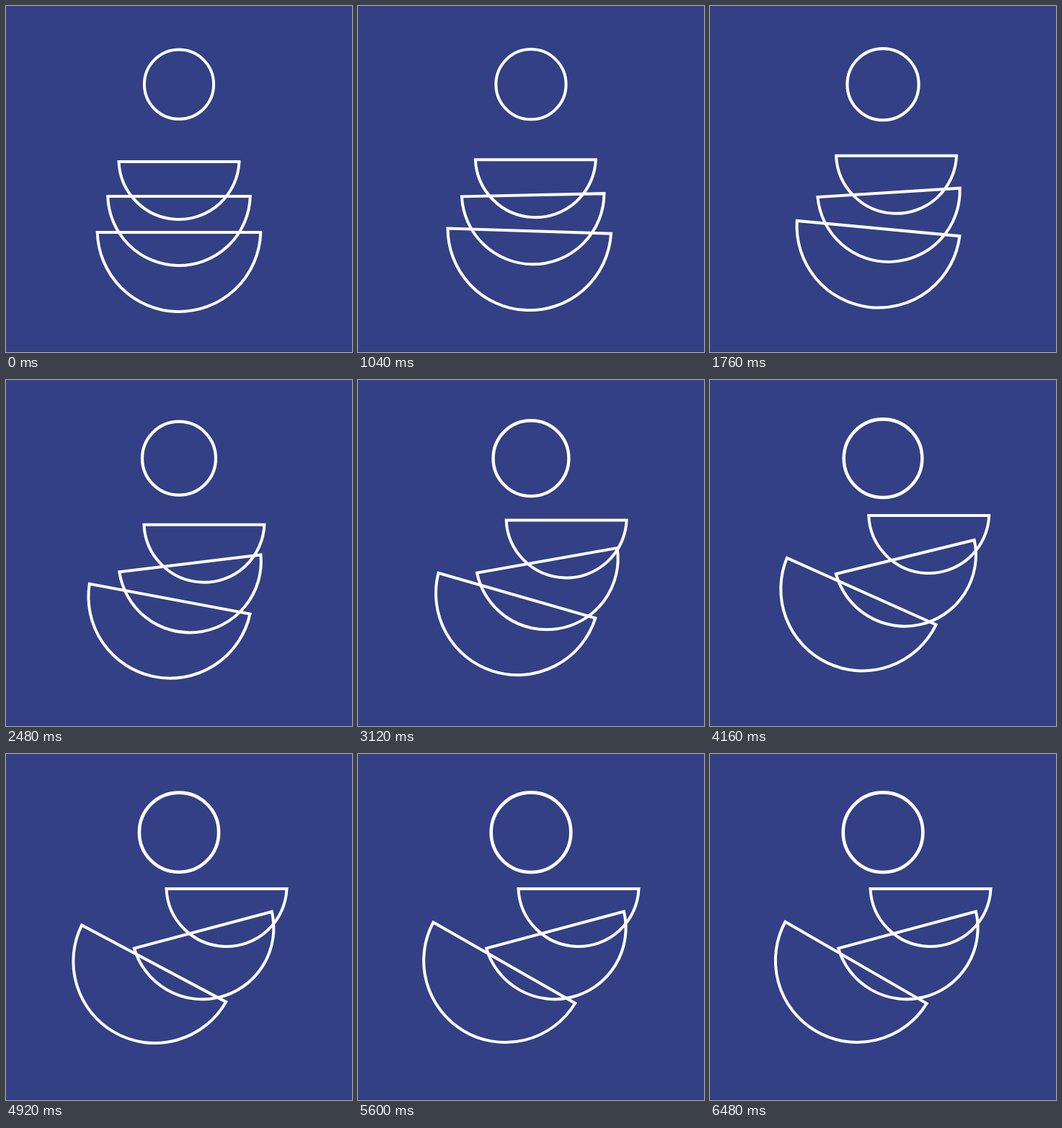
Recreate the animation shown at these times as an HTML page with a canvas. Size 480 by 480 pixels, loop 6.52 s.

```html
<!DOCTYPE html>
<html lang="en">
<head>
<meta charset="utf-8">
<title>Balancing bowls</title>
<style>
  html, body { margin: 0; width: 100%; height: 100%; overflow: hidden; background: #334085; }
  canvas { display: block; width: 100vw; height: 100vh; }
</style>
</head>
<body>
<canvas id="stage" width="480" height="480"></canvas>
<script>
const SIZE = 480;
const LOOP = 6520;
const canvas = document.getElementById('stage');
const ctx = canvas.getContext('2d');

// x, y: middle of the rim; w: half width; h: depth; dx, dy, turn: total motion
const bowls = [
  { x: 240, y: 314, w: 113.3, h: 110, dx: -65, dy: -31.9, turn: 30, time: 6000 },
  { x: 240, y: 264, w: 98.8, h: 96, dx: 45.9, dy: -21.6, turn: -15, time: 5200 },
  { x: 240, y: 216, w: 83.5, h: 80, dx: 66, dy: -29, turn: 0, time: 4800 }
];
const ball = { x: 240, y: 108.7, r: 48.1, grow: 0.15, time: 5600 };

// Cubic Bezier ease (.42, 0, .58, 1), solved by bisection
function ease(x) {
  if (x <= 0) return 0;
  if (x >= 1) return 1;
  let lo = 0, hi = 1;
  for (let i = 0; i < 24; i++) {
    const s = (lo + hi) / 2, q = 1 - s;
    const at = 1.26 * s * q * q + 1.74 * s * s * q + s * s * s;
    if (at < x) lo = s; else hi = s;
  }
  return lo * lo * (3 - 2 * lo);
}

function drawBowl(b, t) {
  const p = ease(t / b.time);
  const r = (b.w * b.w + b.h * b.h) / (2 * b.h);
  const rim = -b.h / 2;
  const dip = Math.asin((r - b.h) / r);
  ctx.save();
  ctx.translate(b.x + b.dx * p, b.y + b.h / 2 + b.dy * p);
  ctx.rotate(b.turn * p * Math.PI / 180);
  ctx.beginPath();
  ctx.arc(0, rim - (r - b.h), r, dip, Math.PI - dip);
  ctx.closePath();
  ctx.stroke();
  ctx.restore();
}

function drawBall(t) {
  const scale = 1 + ball.grow * ease(t / ball.time);
  ctx.save();
  ctx.translate(ball.x, ball.y);
  ctx.scale(scale, scale);
  ctx.beginPath();
  ctx.arc(0, 0, ball.r, 0, Math.PI * 2);
  ctx.stroke();
  ctx.restore();
}

function draw(t) {
  ctx.fillStyle = '#334085';
  ctx.fillRect(0, 0, SIZE, SIZE);
  ctx.fillStyle = '#2d3874';
  ctx.fillRect(0, SIZE - 1, SIZE, 1);
  ctx.strokeStyle = '#fff';
  ctx.lineWidth = 4;
  ctx.lineJoin = 'miter';
  bowls.forEach(b => drawBowl(b, t));
  drawBall(t);
}

const start = performance.now();
function tick() {
  draw((performance.now() - start) % LOOP);
  requestAnimationFrame(tick);
}
tick();
</script>
</body>
</html>
```
